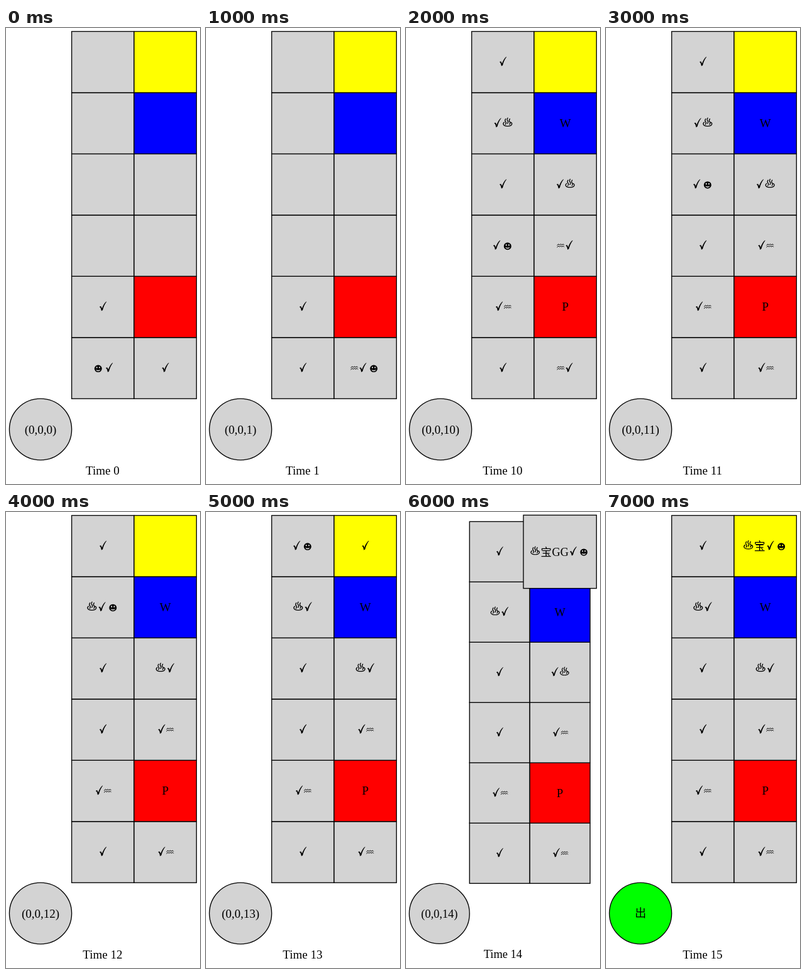
Write an HTML page that moves like this. It is 309 px wide and 726 px high and loops after 8 s.

```html
<!DOCTYPE html>
<html lang="en">
<head>
<meta charset="utf-8">
<title>Grid explorer</title>
<style>
  html, body { margin: 0; width: 100%; height: 100%; overflow: hidden; background: #fff; }
  svg { display: block; width: 309px; height: 726px; }
  text { font: 19px "Liberation Serif", "Times New Roman", serif; text-anchor: middle; }
  .han { font: 18px "Noto Sans CJK SC", "Noto Sans CJK JP", "Noto Sans CJK", sans-serif; }
  .box { stroke: #000; stroke-width: 1.35; }
  .line { fill: none; stroke: #000; stroke-linecap: round; stroke-linejoin: round; }
</style>
</head>
<body>
<svg id="stage" viewBox="0 0 309 726" role="img" aria-label="Grid explorer"></svg>
<script>
const NS = 'http://www.w3.org/2000/svg';
const STEP = 1000;
const GRAY = '#d3d3d3';
const stage = document.getElementById('stage');

function add(parent, tag, attrs, content) {
  const el = document.createElementNS(NS, tag);
  for (const key in attrs) el.setAttribute(key, attrs[key]);
  if (content) el.textContent = content;
  return parent.appendChild(el);
}

// Advance width of each sign at the normal font size
const ADVANCE = { '✓': 15, '☻': 20, '♨': 17, '♒': 12, '宝': 19, '出': 18, G: 13.7, W: 18, P: 10.6 };

// Signs are drawn around the middle of their advance
const SIGNS = {
  '✓': { d: 'M-5.5 .4C-4.6 -1 -3.2 -1.4 -2.6 -.4L-1.4 2.4C0 -2 2.4 -6.2 5.4 -8.5L5.9 -8.2' +
            'C3 -4.5 .9 .5 -.2 5C-.8 5.6 -1.8 6.2 -2.4 6.3C-2.7 4.5 -3.4 1.8 -4 1C-4.4 .4 -5 .3 -5.5 .4Z' },
  '☻': { d: 'M-6 .8A6 5.8 0 1 1 6 .8A6 5.8 0 1 1 -6 .8Z' +
            'M-3.2 -1A1.1 1.3 0 1 0 -1 -1A1.1 1.3 0 1 0 -3.2 -1Z' +
            'M1 -1A1.1 1.3 0 1 0 3.2 -1A1.1 1.3 0 1 0 1 -1Z' +
            'M-3.9 2.2Q0 4.2 3.9 2.2Q2.6 5 0 5Q-2.6 5 -3.9 2.2Z', 'fill-rule': 'evenodd' },
  '♨': { d: 'M-5.2 -1.6C-8.4 .4 -7.2 4.6 0 4.6C7.2 4.6 8.4 .4 5.2 -1.6' +
            [-3.3, 0, 3.3].map(x => `M${x + .3} ${x ? -7 : -8.5}q-2 2.6 -.2 4.6t-.3 4.2`).join(''),
         class: 'line', 'stroke-width': 1.25 },
  '♒': { d: [0, 3].map(y => `M-5.4 ${y - .7}l2.2 -1.9l1.5 1.4l2.2 -1.4l1.5 1.4l2.1 -1.4l1.3 1.4`).join(''),
         class: 'line', 'stroke-width': 1 }
};

function label(parent, signs, x, y, scale) {
  const g = add(parent, 'g', { transform: `translate(${x} ${y}) scale(${scale})` });
  let left = -[...signs].reduce((sum, c) => sum + ADVANCE[c], 0) / 2;
  for (const c of signs) {
    const mid = left + ADVANCE[c] / 2;
    if (SIGNS[c]) add(g, 'path', { ...SIGNS[c], transform: `translate(${mid} 0)` });
    else add(g, 'text', { x: mid, y: 6.4, class: c > '~' ? 'han' : '' }, c);
    left += ADVANCE[c];
  }
}

const NORMAL = { x: 104.6, y: 5.5, w: 99.4, h: 97.45, cx: 55, cy: 639, rx: 49.6, ry: 48.9, tx: 153.8, ty: 711, scale: 1 };
const SHRUNK = { x: 101.2, y: 15.3, w: 96, h: 96, cx: 53.2, cy: 639.4, rx: 48, ry: 48, tx: 154.4, ty: 710.3, scale: .97 };

// Cells from top to bottom, left column then right column
const STATES = [
  { time: 0, left: ',,,,✓,☻✓', right: ',,,,,✓' },
  { time: 1, left: ',,,,✓,✓', right: ',,,,,♒✓☻' },
  { time: 10, left: '✓,✓♨,✓,✓☻,✓♒,✓', right: ',W,✓♨,♒✓,P,♒✓' },
  { time: 11, left: '✓,✓♨,✓☻,✓,✓♒,✓', right: ',W,✓♨,✓♒,P,✓♒' },
  { time: 12, left: '✓,♨✓☻,✓,✓,✓♒,✓', right: ',W,♨✓,✓♒,P,✓♒' },
  { time: 13, left: '✓☻,♨✓,✓,✓,✓♒,✓', right: '✓,W,♨✓,✓♒,P,✓♒' },
  { time: 14, left: '✓,♨✓,✓,✓,✓♒,✓', right: '♨宝GG✓☻,W,✓♨,✓♒,P,✓♒', grown: true },
  { time: 15, left: '✓,♨✓,✓,✓,✓♒,✓', right: '♨宝✓☻,W,♨✓,✓♒,P,✓♒', out: true }
];
const RIGHT_FILLS = ['#ff0', '#00f', GRAY, GRAY, '#f00', GRAY];

function cell(parent, signs, cx, cy, w, h, fill, scale) {
  add(parent, 'rect', { x: cx - w / 2, y: cy - h / 2, width: w, height: h, fill, class: 'box' });
  label(parent, signs, cx, cy, scale);
}

function build({ time, left, right, grown, out }) {
  const m = grown ? SHRUNK : NORMAL;
  const g = add(stage, 'g', { visibility: 'hidden' });
  const size = `font-size:${19 * m.scale}px`;
  const columns = [left.split(','), right.split(',')];
  // Bottom row first, so that the grown cell covers its neighbours
  for (let row = 5; row >= 0; row--) {
    columns.forEach((signs, col) => {
      const big = grown && row === 0 && col === 1;
      cell(g, signs[row], m.x + m.w * (col + .5), m.y + m.h * (row + .5),
        big ? 116.4 : m.w, big ? 116.6 : m.h,
        col && !big ? RIGHT_FILLS[row] : GRAY, m.scale);
    });
  }
  add(g, 'ellipse', { cx: m.cx, cy: m.cy, rx: m.rx, ry: m.ry, fill: out ? '#0f0' : GRAY, class: 'box' });
  if (out) label(g, '出', m.cx, m.cy, 1);
  else add(g, 'text', { x: m.cx, y: m.cy + 6.6, style: size }, `(0,0,${time})`);
  add(g, 'text', { x: m.tx, y: m.ty, style: size }, `Time ${time}`);
  return g;
}

const scenes = STATES.map(build);
const start = performance.now();

function draw(now) {
  const current = Math.floor(Math.max(0, now - start) / STEP) % scenes.length;
  scenes.forEach((g, i) => g.setAttribute('visibility', i === current ? 'visible' : 'hidden'));
  requestAnimationFrame(draw);
}
draw(start);
</script>
</body>
</html>
```
